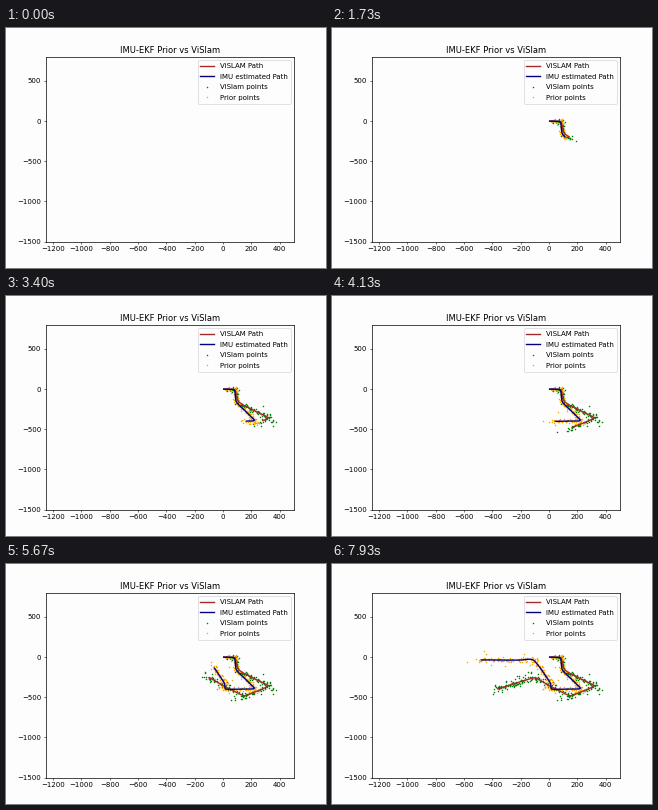
These frames come from a looping animation (320 by 240 pixels, 8 s). A matplotlib script:

```python
import numpy as np
import matplotlib.pyplot as plt
from matplotlib.animation import FuncAnimation

FRAMES = 120
LOOP = 8000
STEP = LOOP / FRAMES / 1000
PAPER = "#fdfdfd"

# Turning points: seconds, x, y
SLAM = np.array([
    (0, 0, 0), (.75, 85, -3), (1.3, 102, -150), (1.73, 148, -205),
    (3.15, 325, -360), (4.13, 150, -490), (5, 5, -360), (5.6, -95, -255),
    (6.1, -140, -272), (7.93, -370, -400)])
IMU = np.array([
    (0, 0, 0), (.75, 82, -5), (1.4, 90, -160), (3.05, 228, -396),
    (4.25, 12, -402), (4.6, 12, -330), (5.67, -60, -140), (6.15, -115, -22),
    (6.6, -210, -38), (7.93, -495, -35)])


def pose(keys, t):
    """Place on the path at time t, with corners rounded by averaging."""
    near = np.asarray(t)[:, None] + np.linspace(-.12, .12, 7)
    return np.column_stack([np.interp(near, keys[:, 0], keys[:, i]).mean(1)
                            for i in (1, 2)])


def cloud(keys, seed, lead, per_step):
    """Map points seen a little ahead of the moving pose, with rare strays."""
    rng = np.random.default_rng(seed)
    born = np.repeat(np.arange(2, FRAMES) * STEP, per_step)
    here = pose(keys, born)
    way = here - pose(keys, born - .15)
    way /= np.hypot(*way.T)[:, None] + 1e-6
    reach = lead * rng.uniform(0, 1, born.size) ** 2 * np.minimum(born / 2, 1)
    spread = np.interp(born, [0, 1.5, 4], [.4, .7, 1.1])
    noise = rng.standard_t(2.5, here.shape).clip(-9, 9) * (8, 13)
    return born, here + way * reach[:, None] + noise * spread[:, None]


times = np.arange(FRAMES) * STEP

plt.rcParams.update({"figure.facecolor": PAPER, "axes.facecolor": PAPER,
                     "axes.linewidth": 1, "lines.linewidth": 2})
fig, ax = plt.subplots(figsize=(6.4, 4.8), dpi=50)
ax.set(xlim=(-1250, 500), ylim=(-1500, 800), title="IMU-EKF Prior vs ViSlam")


def add_path(keys, color, label):
    line, = ax.plot([], [], color=color, label=label, zorder=3)
    return line, times, pose(keys, times)


def add_dots(keys, color, label, seed, lead):
    dots, = ax.plot([], [], ls="", marker="o", ms=2.2, mew=0, color=color,
                    label=label, zorder=2)
    return dots, *cloud(keys, seed, lead, 3)


layers = [
    add_path(SLAM, "brown", "ViSLAM Path"),
    add_path(IMU, "navy", "IMU estimated Path"),
    add_dots(SLAM, "green", "ViSlam points", 4, 85),
    add_dots(IMU, "orange", "Prior points", 9, 75),
]
ax.legend(loc="upper right", labelspacing=.66)


def update(k):
    for artist, born, pts in layers:
        artist.set_data(*pts[born <= k * STEP].T)
    return [layer[0] for layer in layers]


anim = FuncAnimation(fig, update, frames=FRAMES, interval=LOOP / FRAMES,
                     init_func=lambda: update(0), repeat=True, repeat_delay=0)
plt.show()
```
